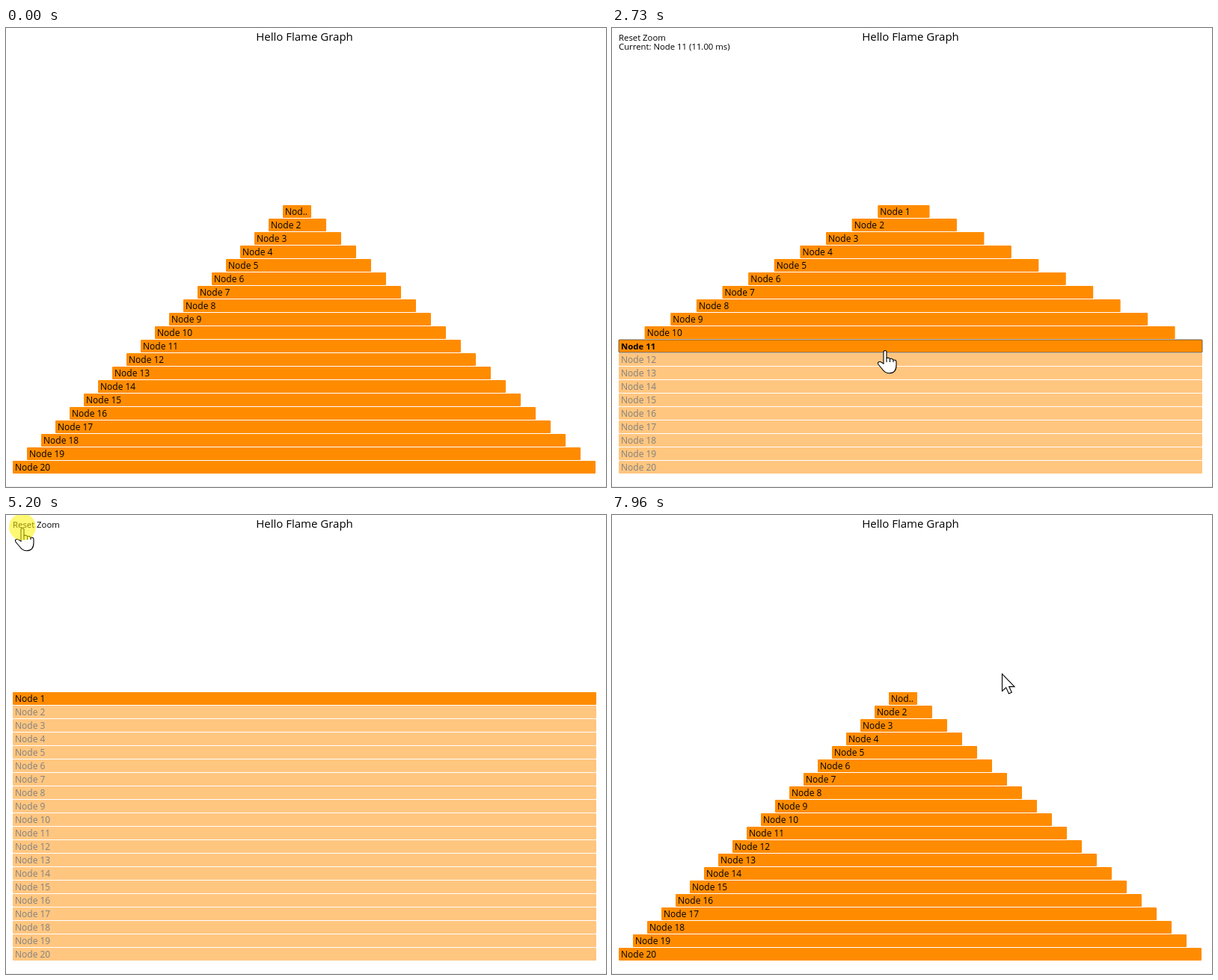
These frames come from a looping animation (802x614 px, 8 s). An HTML page with a canvas:

```html
<!DOCTYPE html>
<html lang="en">
<head>
<meta charset="utf-8">
<title>Hello Flame Graph</title>
<style>
  html, body { margin: 0; width: 100%; height: 100%; overflow: hidden; background: #fff; }
  canvas { display: block; }
</style>
</head>
<body>
<canvas id="stage" width="802" height="614"></canvas>
<script>
const ctx = document.getElementById('stage').getContext('2d');
const LOOP = 8000, STEP = 80, PRESS = 170;
const COUNT = 20, LEFT = 9, RIGHT = 789, TOP = 237, ROW = 18;
const FAMILY = '"Open Sans", "Noto Sans", sans-serif';

// The pointer enters from below and glides to each spot in turn
const ENTRY = { x: 388, y: 829 };
const GLIDES = [
  { start: 360, end: 530, x: 388, y: 300 },
  { start: 760, end: 1000, x: 396, y: 226 },
  { start: 1080, end: 1480, x: 384, y: 316 },
  { start: 2020, end: 2570, x: 365, y: 431 },
  { start: 3060, end: 3850, x: 387, y: 252 },
  { start: 4190, end: 5030, x: 22, y: 17 },
  { start: 5440, end: 5920, x: 592, y: 171 },
  { start: 6250, end: 6390, x: 471, y: 523 },
  { start: 6950, end: 7430, x: 40, y: 14 },
  { start: 7790, end: 7960, x: 521, y: 212 }
];
// Each click zooms to the node under the pointer, or resets when there is none
const CLICKS = [1720, 2730, 4110, 5270, 6720, 7790];

const HAND = new Path2D('M-2 18V2.500A2 2 0 0 1 2 2.500V10.500Q5 9.500 6.500 11.500' +
  'Q9.500 10.500 11 13Q15 12.500 15 16V20Q15 30.800 5.500 30.800Q0 30.800 -4 25' +
  'L-9 19Q-11 15 -6 15.500Z');
const KNUCKLES = new Path2D('M2 10.500V16M6.500 11.500V16M11 13V16');
const ARROW = new Path2D('M.5 .5V23.500L5.700 18.800L9.500 27L13.300 25.300L9.700 17.600H17Z');

function pointerAt(t) {
  let { x, y } = ENTRY;
  for (const glide of GLIDES.filter(g => t >= g.start)) {
    const span = glide.end - glide.start;
    const gaps = Math.round(span / STEP);
    const done = Math.floor((t - glide.start) / span * gaps + 1e-6) + 1;
    const p = 1 - (1 - Math.min(1, done / (gaps + 1))) ** 1.5;
    x += (glide.x - x) * p;
    y += (glide.y - y) * p;
  }
  return { x, y };
}

function barOf(n, zoom) {
  const left = k => 389 - 19 * k, width = k => 39 * k - 1;
  let x = left(n), w = width(n);
  if (zoom && n >= zoom) {
    x = LEFT;
    w = RIGHT - LEFT;
  } else if (zoom) {
    const scale = (RIGHT - LEFT) / width(zoom);
    x = LEFT + (x - left(zoom)) * scale;
    w *= scale;
  }
  return { x, y: TOP + ROW * (n - 1), w, h: ROW - 1 };
}

function nodeUnder({ x, y }, zoom) {
  const n = Math.floor((y - TOP + 1) / ROW) + 1;
  if (n < 1 || n > COUNT) return 0;
  const bar = barOf(n, zoom);
  return x >= bar.x && x <= bar.x + bar.w ? n : 0;
}

function zoomAt(t) {
  return CLICKS.filter(click => t >= click)
    .reduce((zoom, click) => nodeUnder(pointerAt(click - 1), zoom), 0);
}

function write(text, x, y, size, weight = 400, color = '#000') {
  ctx.font = `${weight} ${size}px ${FAMILY}`;
  ctx.fillStyle = color;
  ctx.fillText(text, x, y);
}

function fit(text, width) {
  ctx.font = `12px ${FAMILY}`;
  if (ctx.measureText(text).width <= width) return text;
  while (text && ctx.measureText(text + '..').width > width) text = text.slice(0, -1);
  return text + '..';
}

function drawBar(n, zoom, hovered) {
  const { x, y, w, h } = barOf(n, zoom);
  const faded = zoom && n > zoom;
  ctx.beginPath();
  ctx.roundRect(x, y, w, h, 1);
  ctx.fillStyle = faded ? '#ffc680' : '#ff8c00';
  ctx.fill();
  if (hovered) {
    ctx.strokeStyle = '#474747';
    ctx.lineWidth = 0.8;
    ctx.stroke();
  }
  const label = fit('Node ' + n, w - 6);
  const [size, weight] = hovered ? [11.4, 700] : [12, 500];
  write(label, x + 3, y + 13, size, weight, faded ? '#808080' : '#000');
}

function drawPointer({ x, y }, hand) {
  ctx.save();
  ctx.translate(x, y);
  ctx.fillStyle = '#fff';
  ctx.strokeStyle = '#000';
  ctx.lineWidth = 1.1;
  const shape = hand ? HAND : ARROW;
  ctx.fill(shape);
  ctx.stroke(shape);
  if (hand) ctx.stroke(KNUCKLES);
  ctx.restore();
}

function drawPress({ x, y }) {
  ctx.fillStyle = 'rgba(255, 243, 0, 0.55)';
  ctx.beginPath();
  ctx.arc(x, y - 1, 18, 0, 2 * Math.PI);
  ctx.fill();
}

function draw(t) {
  const zoom = zoomAt(t);
  const pointer = pointerAt(t);
  const node = nodeUnder(pointer, zoom);
  const onReset = pointer.x < 72 && pointer.y > 8 && pointer.y < 20;

  ctx.fillStyle = '#fff';
  ctx.fillRect(0, 0, 802, 614);
  ctx.fillStyle = '#ececec';
  ctx.fillRect(0, 613, 802, 1);

  ctx.textAlign = 'center';
  write('Hello Flame Graph', 399, 17, 15);
  ctx.textAlign = 'left';
  if (zoom) write('Reset Zoom', 9, 17, 11.35);
  if (node) write(`Current: Node ${node} (${node.toFixed(2)} ms)`, 9, 29, 11.35);
  for (let n = 1; n <= COUNT; n++) drawBar(n, zoom, n === node);

  // The pointer only shows once it is well inside the graph
  if (pointer.y < 570) drawPointer(pointer, node || onReset);
  if (CLICKS.some(click => t >= click - PRESS && t < click)) drawPress(pointer);
}

const begin = performance.now();
function tick() {
  draw((performance.now() - begin) % LOOP);
  requestAnimationFrame(tick);
}
tick();
</script>
</body>
</html>
```
